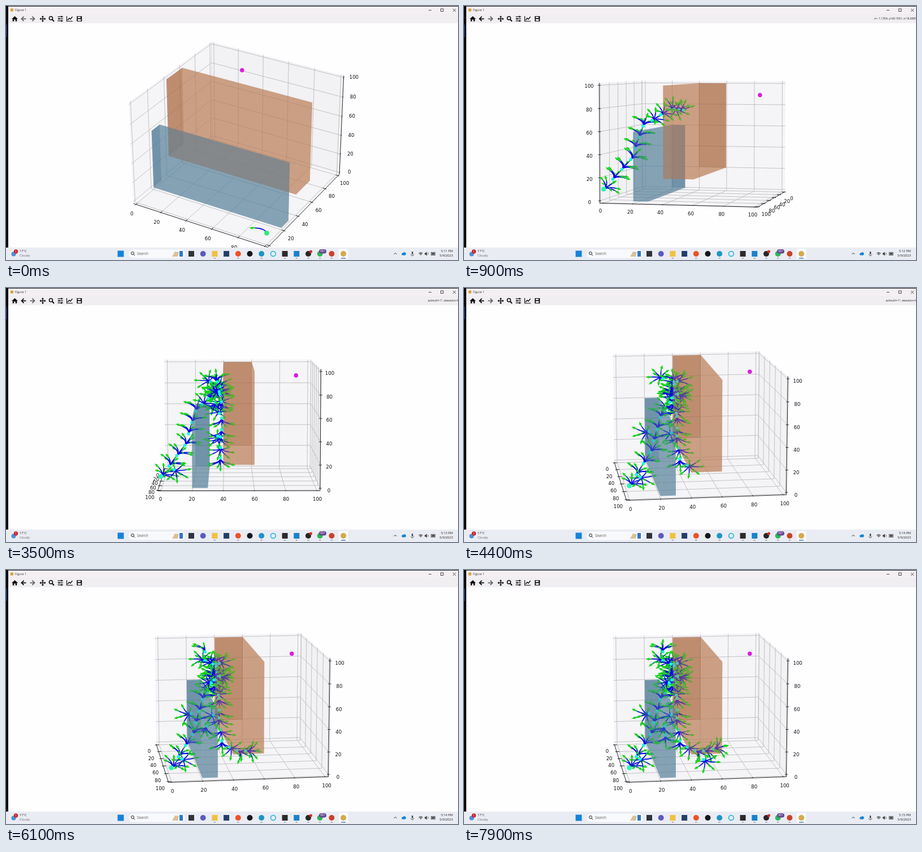
An HTML page with a canvas for the animation above (8 s loop, 800x450 px).

```html
<!DOCTYPE html>
<html lang="en">
<head>
<meta charset="utf-8">
<title>Figure 1</title>
<style>
html, body { margin: 0; width: 800px; height: 450px; overflow: hidden; background: #fff; }
canvas { display: block; }
</style>
</head>
<body>
<canvas id="stage" width="800" height="450"></canvas>
<script>
const ctx = document.getElementById('stage').getContext('2d');
const LOOP = 8000, STEP = 100;
const LO = -2.08, HI = 102.08;
const UI = '"Open Sans", sans-serif', PLOT = '"DejaVu Sans", sans-serif';
const ticks = Array.from({ length: 6 }, (_, i) => i * 20);

// Camera moves: start time, azimuth, elevation.
const TURN = 300;
const views = [[0, -60, 30], [300, 13.3, 3.3], [1500, 3.5, 4], [2300, -.5, 6], [4000, -7.7, 12]];
const goal = [30, 90, 90];
const boxes = [
  { min: [0, 40, 20], max: [100, 60, 100], side: '184,123,82', back: '131,50,0' },
  { min: [0, 20, 0], max: [100, 30, 60], side: '86,127,152', back: '5,65,110' }
];

const lerp = (a, b, f) => a + (b - a) * f;
const clamp = v => Math.max(0, Math.min(1, v));
const add = (p, q, k = 1) => p.map((v, i) => v + q[i] * k);
const dot = (p, q) => p[0]*q[0] + p[1]*q[1] + p[2]*q[2];
const cross = (p, q) => [p[1]*q[2] - p[2]*q[1], p[2]*q[0] - p[0]*q[2], p[0]*q[1] - p[1]*q[0]];
const unit = p => p.map(v => v / Math.hypot(...p));

let seed = 7;
const random = () => (seed = seed * 16807 % 2147483647) / 2147483647;

// The search tree: nodes spread evenly over routes, plus a cloud in the gap.
const RING = 7, REACH = 10.5, SPREAD = .95;
const nodes = [];
function grow(count, start, end, place) {
  for (let i = 0; i < count; i++) {
    const f = count > 1 ? i / (count - 1) : 0;
    nodes.push({ pos: place(f), birth: lerp(start, end, f) });
  }
}
const along = (...route) => f => {
  const s = f * (route.length - 1), i = Math.min(Math.floor(s), Math.max(0, route.length - 2));
  return route.length < 2 ? route[0] : add(route[i], add(route[i + 1], route[i], -1), s - i);
};
const cloud = () => [lerp(18, 55, random()), lerp(33, 39, random()), lerp(55, 88, random())];

grow(13, 0, 860, along([100, 0, 10], [88, 15, 35], [83, 22, 64], [60, 34, 78], [37, 38, 76]));
grow(4, 1000, 2000, along([36, 38, 66], [35, 39, 44], [42, 38, 35]));
grow(12, 1000, 5000, cloud);
grow(1, 1200, 1200, along([90, 8, 14]));
grow(1, 1900, 1900, along([25, 36, 33]));
grow(5, 2400, 5100, along([52, 38, 27], [56, 38, 18], [50, 44, 10], [51, 49, 7], [50, 55, 6]));
grow(2, 2000, 6000, along([19, 31, 83], [19, 31, 91]));
grow(1, 3900, 3900, along([90, 14, 54]));
grow(2, 5600, 6600, along([30, 31, 24], [32, 31, 16]));
grow(2, 6500, 7500, along([65, 53, 3], [48, 62, 7]));
nodes.sort((a, b) => a.birth - b.birth);

// Each node fans out along the direction from its nearest predecessor.
nodes.forEach((node, i) => {
  let h = [-.62, .55, .56];
  if (i) {
    const gap = q => Math.hypot(...add(node.pos, q.pos, -1));
    const parent = nodes.slice(0, i).reduce((a, b) => gap(b) < gap(a) ? b : a);
    h = unit(add(node.pos, parent.pos, -1));
  }
  const e1 = unit([-h[1] - .001, h[0], 0]), e2 = cross(h, e1);
  node.arms = Array.from({ length: RING + 1 }, (_, k) => {
    const a = k * 2 * Math.PI / RING, spread = k < RING ? SPREAD : 0;
    const side = add(e1.map(v => v * Math.cos(a)), e2, Math.sin(a));
    const dir = add(h.map(v => v * Math.cos(spread)), side, Math.sin(spread));
    return { mid: add(node.pos, h, REACH * .42), end: add(node.pos, dir, REACH) };
  });
});

let cam;
function setView(t) {
  let i = views.length - 1;
  while (views[i][0] > t) i--;
  const f = clamp((t - views[i][0]) / TURN), from = views[Math.max(0, i - 1)];
  const az = lerp(from[1], views[i][1], f), el = lerp(from[2], views[i][2], f);
  const a = az * Math.PI / 180, e = el * Math.PI / 180;
  const [ca, sa, ce, se] = [Math.cos(a), Math.sin(a), Math.cos(e), Math.sin(e)];
  cam = {
    u: [-sa, ca, 0], v: [-se*ca, -se*sa, ce], n: [ce*ca, ce*sa, se],
    far: az < 0 ? HI : LO, near: az < 0 ? LO : HI
  };
}
const scaled = p => p.map((v, i) => (v - 50) / 104.16 * (i < 2 ? 1.1428 : .857));
function project(p) {
  const d = scaled(p), k = 2385 / (10 - dot(cam.n, d));
  return [411 + dot(cam.u, d) * k, 237 - dot(cam.v, d) * k];
}

function path(points, closed) {
  ctx.beginPath();
  points.forEach(p => ctx.lineTo(...p));
  if (closed) ctx.closePath();
}
function line(points, color, width = 1) {
  path(points);
  ctx.strokeStyle = color;
  ctx.lineWidth = width;
  ctx.stroke();
}
const line3 = (points, color, width) => line(points.map(project), color, width);
function poly(points, color) { path(points, true); ctx.fillStyle = color; ctx.fill(); }
function rect(x, y, w, h, color) { ctx.fillStyle = color; ctx.fillRect(x, y, w, h); }
function pill(x, y, w, h, color) {
  ctx.beginPath();
  ctx.roundRect(x, y, w, h, h / 2);
  ctx.fillStyle = color;
  ctx.fill();
}
function disc(x, y, r, color) {
  ctx.beginPath();
  ctx.arc(x, y, r, 0, 7);
  ctx.fillStyle = color;
  ctx.fill();
}
function arc(x, y, r, color, width, from = 0, to = 7) {
  ctx.beginPath();
  ctx.arc(x, y, r, from, to);
  ctx.strokeStyle = color;
  ctx.lineWidth = width;
  ctx.stroke();
}
function text(s, x, y, size, color = '#222', align = 'left', font = UI) {
  ctx.font = size + 'px ' + font;
  ctx.textAlign = align;
  ctx.textBaseline = 'middle';
  ctx.fillStyle = color;
  ctx.fillText(s, x, y);
}

function drawAxes() {
  const { far, near } = cam, grid = '#b4b4b8', ink = '#111';
  const pane = (color, ...pts) => poly(pts.map(project), color);
  pane('#f5f4f7', [LO,LO,LO], [LO,HI,LO], [LO,HI,HI], [LO,LO,HI]);
  pane('#f2f1f3', [LO,far,LO], [HI,far,LO], [HI,far,HI], [LO,far,HI]);
  pane('#f5f4f6', [LO,LO,LO], [HI,LO,LO], [HI,HI,LO], [LO,HI,LO]);
  for (const t of ticks) {
    line3([[t,near,LO], [t,far,LO], [t,far,HI]], grid, .8);
    line3([[HI,t,LO], [LO,t,LO], [LO,t,HI]], grid, .8);
    line3([[LO,near,t], [LO,far,t], [HI,far,t]], grid, .8);
  }
  line3([[LO,far,LO], [LO,far,HI]], '#d2d2d5', .8);

  const side = Math.sign(near - 50), k = 5.2;
  line3([[LO,near,LO], [HI,near,LO]], ink, .9);
  line3([[HI,LO,LO], [HI,HI,LO]], ink, .9);
  line3([[HI,far,LO], [HI,far,HI]], ink, .9);
  const label = (t, p) => {
    const [x, y] = project(p);
    text(t, x, y + 2.5, 8.6, ink, 'center', PLOT);
  };
  for (const t of ticks) {
    line3([[t,near + side,LO], [t,near - side*1.8,LO]], ink, .9);
    line3([[HI + 1,t,LO], [HI - 1.8,t,LO]], ink, .9);
    line3([[HI,far - side,t], [HI,far + side,t]], ink, .8);
    label(t, [t, near + side*k, LO - k]);
    label(t, [HI + k, t, LO - k]);
    label(t, [HI + k, far - side*k, t]);
  }
}

function drawArm(from, arm) {
  const [a, b, c] = [from, arm.mid, arm.end].map(project);
  ctx.beginPath();
  ctx.moveTo(...a);
  ctx.quadraticCurveTo(...b, ...c);
  ctx.strokeStyle = '#0505e0';
  ctx.lineWidth = 1.7;
  ctx.stroke();
  const dx = c[0] - b[0], dy = c[1] - b[1], len = Math.hypot(dx, dy) || 1;
  const [x, y] = [dx / len, dy / len], size = Math.min(1, len / 10), green = '#16d816';
  const on = (f, s) => [c[0] + (x*f - y*s) * size, c[1] + (y*f + x*s) * size];
  line([on(-7, 0), on(2, 0)], green, 1.6);
  poly([on(4, 0), on(-2, 2.5), on(-2, -2.5)], green);
}

function drawTree(t) {
  const alive = nodes.filter(n => t >= n.birth);
  for (const { pos, birth, arms } of alive) {
    arms.slice(0, 1 + (t - birth) / 30).forEach(arm => drawArm(pos, arm));
    if (birth) disc(...project(pos), 2.8, '#1cf5e4');
  }
  disc(...project(nodes[0].pos), 4.3, t < 300 ? '#2eea78' : '#2cf5b4');
}

function boxFaces({ min, max, side, back }) {
  const faces = [];
  for (let axis = 0; axis < 3; axis++) {
    const b = (axis + 1) % 3, c = (axis + 2) % 3;
    for (const end of [min, max]) {
      const pts = [[min,min], [max,min], [max,max], [min,max]].map(([s, r]) => {
        const p = [];
        p[axis] = end[axis]; p[b] = s[b]; p[c] = r[c];
        return p;
      });
      const toEye = 10 * cam.n[axis] - scaled(pts[0])[axis];
      const tone = axis === 0 && end === min ? back : side;
      faces.push({ pts, facing: (end === max) === (toEye > 0), color: `rgba(${tone},.45)` });
    }
  }
  return faces;
}
const drawFaces = faces => faces.forEach(f => poly(f.pts.map(project), f.color));

function drawWindow(t) {
  const ink = '#111';
  rect(0, 0, 800, 30.5, '#f1eef1');
  rect(0, 0, 800, 14, '#f3eff3');
  rect(0, 0, 800, 1, '#2a2a2c');
  rect(0, 0, 4, 428, '#060608');
  rect(0, 33, 1.5, 22, '#12307c');
  disc(10.5, 7, 2.8, '#d9a23a');
  text('Figure 1', 16, 7.3, 5.4, '#333');
  line([[748,7.5], [753,7.5]], '#222', .8);
  ctx.strokeRect(769.5, 5, 4.5, 4.5);
  line([[791,5], [796,10]], '#222', .8);
  line([[796,5], [791,10]], '#222', .8);

  poly([[10,23], [15.5,18], [21,23], [19.3,23], [19.3,27.3], [16.7,27.3], [16.7,24], [14.3,24], [14.3,27.3], [11.7,27.3], [11.7,23]], ink);
  const arrow = (x, dir, color) => {
    line([[x - 4*dir, 22.7], [x + 4*dir, 22.7]], color, 1.8);
    line([[x, 18.7], [x + 4*dir, 22.7], [x, 26.7]], color, 1.8);
  };
  arrow(31.5, -1, t < 300 ? '#666' : ink);
  arrow(46.5, 1, '#666');
  for (const [x, y] of [[1,0], [-1,0], [0,1], [0,-1]]) {
    const on = (f, s) => [65 + x*f - y*s, 22.7 + y*f + x*s];
    line([on(0, 0), on(5, 0)], ink, 1.4);
    poly([on(5.5, 0), on(3, 2.3), on(3, -2.3)], ink);
  }
  arc(79.5, 21.5, 3, ink, 1.6);
  line([[81.7,23.8], [85,27.2]], ink, 2);
  for (let i = 0; i < 3; i++) {
    const y = 19 + i * 3.7;
    line([[91.5,y], [101,y]], ink, 1.2);
    rect(i === 1 ? 93 : 97.5, y - 1.5, 1.6, 3, ink);
  }
  line([[107.5,18], [107.5,27], [118,27]], ink, 1.2);
  line([[109,25], [112,21.5], [114,23.5], [117.5,19]], ink, 1.4);
  rect(125.3, 18, 9, 9.4, ink);
  rect(127, 19, 5, 2.4, '#eee');
  rect(127, 23.2, 5.5, 3.2, '#eee');

  const status = t < 500 || t >= 4700 ? ''
    : t < 1600 ? 'x=−1.1354, y=60.1951, z=18.6983'
    : t < 2400 ? 'x=−1.2671, y=82.5549, z=19.8491'
    : 'azimuth=1°, elevation=6°';
  text(status, t < 2400 ? 726 : 746.5, 22.7, 4.9);
}

function drawTaskbar(t) {
  rect(0, 428, 800, 22, '#eaecf3');
  disc(13.5, 439.5, 4, '#4d8fd6');
  disc(17.5, 435, 3.7, '#c8242c');
  text('1', 17.5, 435.2, 5, '#fff', 'center');
  text('17°C', 24, 434.6, 5.7);
  text('Cloudy', 24, 442.6, 5.7, '#667');

  rect(197.5, 433.5, 11, 11, '#1683d8');
  pill(217, 431.5, 100, 15, '#f8f9fc');
  arc(224, 438, 2.5, '#222', 1);
  line([[225.8,440], [228,442.3]], '#222', 1);
  text('Search', 232, 439.2, 6.3, '#555');
  poly([[294,444], [299,435], [306,436], [304,444]], '#d8c19a');
  rect(307, 434, 6, 10, '#2e78c6');

  // Evenly spaced app icons; the last one is the active window.
  const apps = ['#30343a', '#5b5bc0', '#f0c040', '#23406a', '#ef5128', '#15171a', '#1f96c4',
    '#2cb9dc', '#2b2b2c', '#1a82cb', '#2a2626', '#2db858', '#c8432a', '#d4aa4b'];
  apps.forEach((color, i) => {
    const x = 328 + i * 20.7, active = i === apps.length - 1;
    if (active) rect(x - 8.5, 430, 17, 18, '#f7f8fb');
    if ([0, 2, 3, 8, 9].includes(i)) rect(x - 5, 434, 10, 10, color);
    else if (i === 7) arc(x, 439, 4.4, color, 1.7);
    else disc(x, 439, 5, color);
    if (active) rect(x - 4, 446.2, 8, 1.3, '#3273b8');
    else if (i > 7 || i % 2 === 0 && i !== 0) rect(x - 1.7, 446.3, 3.4, 1.1, '#7d838b');
  });
  disc(539.5, 435, 2.6, '#d32e28');
  pill(554, 431, 13, 7.5, '#65478f');
  text('99+', 560.5, 434.9, 5, '#fff', 'center');

  line([[686.5,440], [689,437.5], [691.5,440]], '#333', 1);
  disc(702.5, 439.5, 2.2, '#1684d8');
  disc(705.2, 439, 2.7, '#1684d8');
  pill(718, 435, 2.4, 5, '#444');
  arc(719.2, 439, 3, '#444', .8, .2, 2.9);
  line([[719.2,442], [719.2,443.5]], '#444', .8);
  for (let r = 1.5; r < 6; r += 1.8) arc(734, 442, r, '#222', 1, -2.35, -.79);
  poly([[741,437.5], [742.5,437.5], [745,435.5], [745,442.5], [742.5,440.5], [741,440.5]], '#444');
  arc(744.5, 439, 2.8, '#444', .8, -.8, .8);
  ctx.strokeRect(752.5, 436.5, 7, 5);
  rect(753.5, 437.5, 5, 3, '#333');
  const minute = 12 + Math.floor((t - 350) / 1950);
  text(`5:${minute} PM`, 791, 434.8, 5.7, '#222', 'right');
  text('5/9/2023', 791, 442.6, 5.7, '#222', 'right');
}

const begin = performance.now();
function frame() {
  const t = Math.floor((performance.now() - begin) % LOOP / STEP) * STEP;
  setView(t);
  rect(0, 0, 800, 450, '#fefdff');
  drawAxes();
  const order = cam.far === HI ? boxes : [...boxes].reverse();
  const faces = order.flatMap(boxFaces);
  drawFaces(faces.filter(f => !f.facing));
  drawTree(t);
  disc(...project(goal), 3.8, '#da1fdc');
  drawFaces(faces.filter(f => f.facing));
  drawWindow(t);
  drawTaskbar(t);
  requestAnimationFrame(frame);
}
frame();
</script>
</body>
</html>
```
